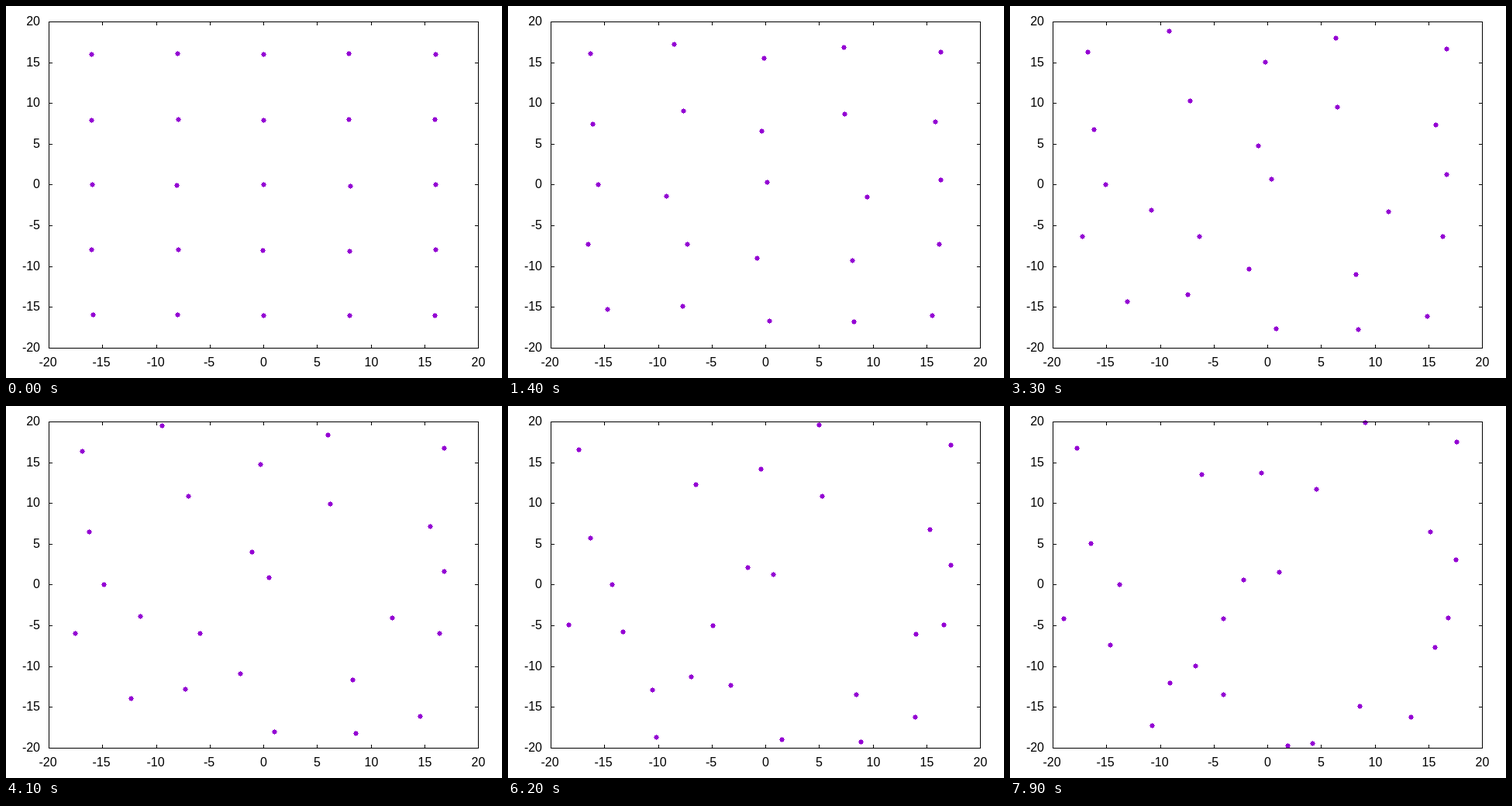
An HTML page that plays this animation: 640 px wide and 480 px high, repeating every 8000 ms.

```html
<!DOCTYPE html>
<html lang="en">
<head>
<meta charset="utf-8">
<title>Particles in a periodic box</title>
<style>
  html, body { margin: 0; width: 100%; height: 100%; overflow: hidden; background: #fff; }
  svg { display: block; width: 640px; height: 480px; }
  text { font: 16px "Liberation Sans", Arial, sans-serif; fill: #000; }
  path { shape-rendering: crispEdges; }
  .line { stroke: #000; fill: none; }
  .dot { fill: #9400d3; }
</style>
</head>
<body>
<svg id="plot" viewBox="0 0 640 480"></svg>
<script>
const LEFT = 55, RIGHT = 609, TOP = 20, BOTTOM = 441;
const WIDTH = RIGHT - LEFT, HEIGHT = BOTTOM - TOP;
const STEPS = 80, STEP_MS = 100, SIDE = 5;
const REACH = 40, STIFFNESS = .001;

// Initial velocity of each particle, row by row, as pixels per loop.
const velocities = `
  -24.4,-8 -38.3,-71.5 -8.2,23.9 -53.2,-48.5 22.5,-15.8
  -6,30.4 26.2,-58 -29,79.3 -48,-39 -11.8,15.8
  30.3,-.3 -92.4,77.2 12.5,-17.7 106,80.6 21.7,-32.4
  -41.6,-41 54,-40.6 -56.7,57 8.1,72.5 10.5,-41.6
  95.7,-42.3 18.2,-63.7 26.5,39.5 15.2,43.2 -36.5,2.2
`.trim().split(/\s+/).map(pair => pair.split(",").map(v => v / STEPS));

const svg = document.getElementById("plot");
const plotX = value => LEFT + WIDTH * (value + 20) / 40;
const plotY = value => BOTTOM - HEIGHT * (value + 20) / 40;
const pixelX = x => Math.floor(x + .5);
const pixelY = y => Math.ceil(y - .5);
const wrap = (v, low, size) => low + ((v - low) % size + size) % size;
const nearest = (d, size) => d - size * Math.round(d / size);

function add(name, attrs, text = "") {
  const el = document.createElementNS("http://www.w3.org/2000/svg", name);
  for (const key in attrs) el.setAttribute(key, attrs[key]);
  el.textContent = text;
  return svg.appendChild(el);
}

function drawScale() {
  let ticks = "";
  for (let value = -20; value <= 20; value += 5) {
    const x = pixelX(plotX(value)), y = pixelY(plotY(value));
    ticks += `M${x + .5} ${TOP}v5M${x + .5} ${BOTTOM + 1}v-5`;
    ticks += `M${LEFT} ${y + .5}h5M${RIGHT + 1} ${y + .5}h-5`;
    add("text", { x: value < 0 ? x - 1 : x + .5, y: 465, "text-anchor": "middle" }, value);
    add("text", { x: 44, y: y + 5, "text-anchor": "end" }, value);
  }
  add("path", { class: "line", d: ticks });
}

// Particles start on a square lattice, drift, and softly repel at close range.
function simulate() {
  const particles = velocities.map(([vx, vy], i) => ({
    x: plotX(8 * (i % SIDE - 2)), y: plotY(8 * (2 - Math.floor(i / SIDE))), vx, vy
  }));
  return Array.from({ length: STEPS }, () => {
    particles.forEach((a, i) => particles.slice(i + 1).forEach(b => {
      const dx = nearest(b.x - a.x, WIDTH), dy = nearest(b.y - a.y, HEIGHT);
      const distance = Math.hypot(dx, dy);
      const push = STIFFNESS * Math.max(0, REACH - distance) / distance;
      a.vx -= push * dx; a.vy -= push * dy;
      b.vx += push * dx; b.vy += push * dy;
    }));
    return particles.map(p => {
      p.x = wrap(p.x + p.vx, LEFT, WIDTH);
      p.y = wrap(p.y + p.vy, TOP, HEIGHT);
      return [pixelX(p.x), pixelY(p.y)];
    });
  });
}

drawScale();
const dots = velocities.map(() =>
  add("path", { class: "dot", d: "M-2-2H0V-3H1V-2H3V0H4V1H3V3H1V4H0V3H-2V1H-3V0H-2Z" }));
add("path", { class: "line", d: `M${LEFT + .5} ${TOP + .5}h${WIDTH}v${HEIGHT}h${-WIDTH}z` });

const states = simulate();
const start = performance.now();

function render() {
  const step = Math.floor((performance.now() - start) / STEP_MS) % STEPS;
  states[step].forEach(([x, y], i) => dots[i].setAttribute("transform", `translate(${x} ${y})`));
  requestAnimationFrame(render);
}
render();
</script>
</body>
</html>
```
